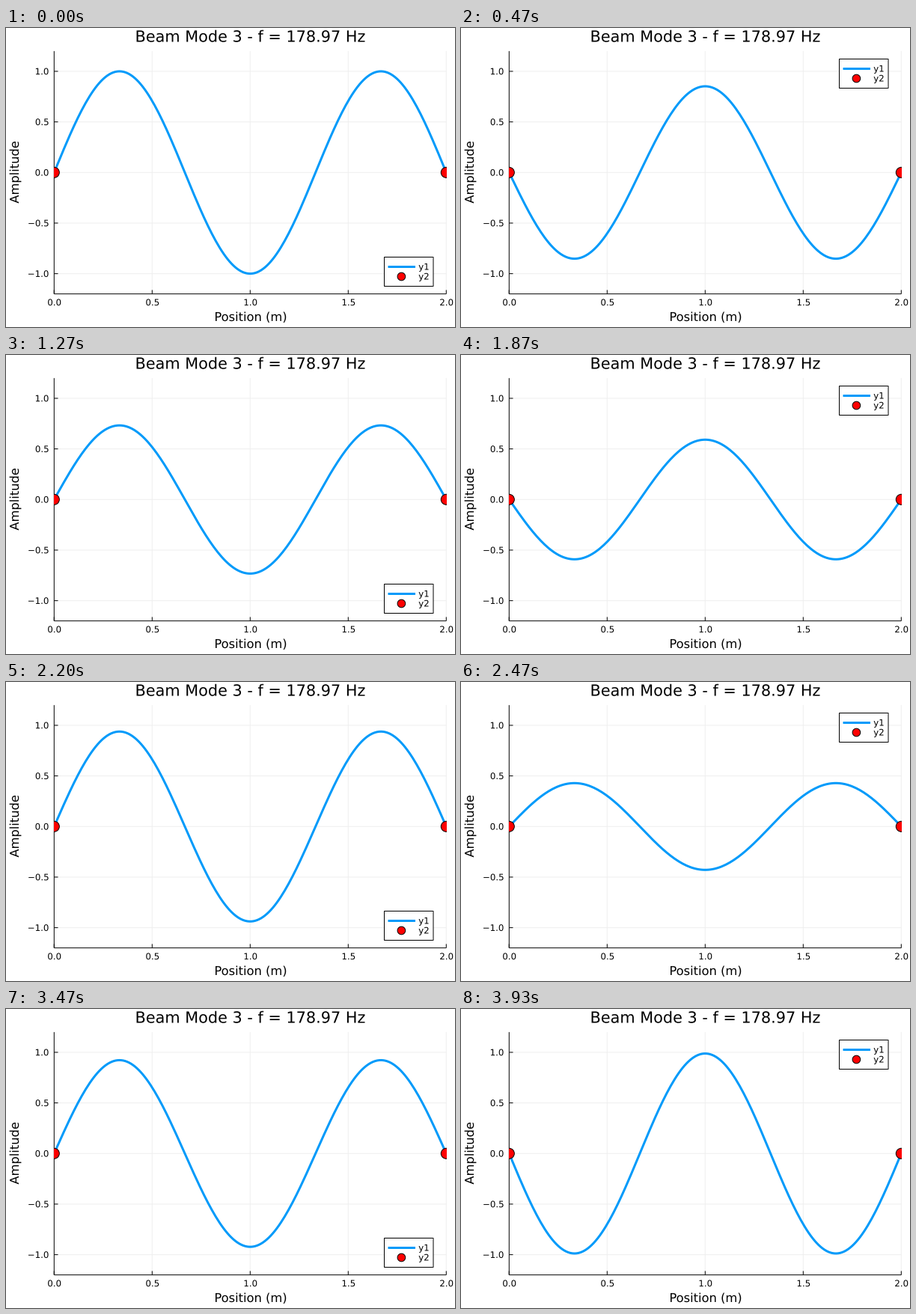
Animation of 600 by 400 pixels, one loop 3990 ms. Source, as a matplotlib script:

```python
import numpy as np
import matplotlib.pyplot as plt
from matplotlib.animation import FuncAnimation
from matplotlib.collections import LineCollection
from matplotlib.patches import Circle, PathPatch, Rectangle
from matplotlib.textpath import TextPath
from matplotlib.transforms import Affine2D

W, H, DPI = 600, 400, 100
TICK_MS, TICKS = 10, 399
RATE = 15                       # pictures per second
CYCLES = 0.058905               # vibration cycles per picture
MODE, LENGTH = 3, 2.0
LEFT, RIGHT, MID, UNIT = 64.3, 588.3, 193.3, 135.35
TOP, BOTTOM = MID - 1.2 * UNIT, MID + 1.2 * UNIT
BLUE = "#009afa"

plt.rcParams["font.family"] = "DejaVu Sans"
plt.rcParams["path.snap"] = False


def px(x):
    return LEFT + (RIGHT - LEFT) * np.asarray(x) / LENGTH


def py(y):
    return MID - UNIT * np.asarray(y)


def pt(pixels):
    return pixels * 72 / DPI


fig = plt.figure(figsize=(W / DPI, H / DPI), dpi=DPI, facecolor="white")
ax = fig.add_axes([0, 0, 1, 1])
ax.set(xlim=(0, W), ylim=(H, 0))
ax.axis("off")
legend_shift = Affine2D()
legend_space = legend_shift + ax.transData


def add(patch, z, space=ax.transData):
    patch.set(transform=space, zorder=z)
    ax.add_artist(patch)
    return patch


def text(x, y, s, size, align=0.5, angle=0, z=1, space=ax.transData):
    """Outlined text on the baseline y; align runs from 0 (left) to 1 (right)."""
    path = TextPath((0, 0), s, size=size)
    shift = -align * path.get_extents().x1
    place = Affine2D().translate(shift, 0).scale(1, -1).rotate_deg(-angle)
    path = path.transformed(place.translate(x, y))
    add(PathPatch(path, fc="black", lw=0), z, space)


def segments(lines, color, width, z):
    ax.add_collection(LineCollection(lines, colors=color, linewidths=pt(width),
                                     zorder=z), autolim=False)


def dot(x, y, radius, z, space=ax.transData):
    return add(Circle((x, y), radius, fc="red", ec="black", lw=pt(1)), z, space)


# Grid, ticks and axes
xticks = np.linspace(0, LENGTH, 5)
yticks = np.linspace(-1, 1, 5)
grid = [[(px(x), TOP), (px(x), BOTTOM)] for x in xticks[1:]]
grid += [[(LEFT, py(y)), (RIGHT, py(y))] for y in yticks]
marks = [[(px(x), BOTTOM), (px(x), BOTTOM - 5.2)] for x in xticks]
marks += [[(LEFT, py(y)), (LEFT + 5.2, py(y))] for y in yticks]
marks += [[(LEFT, TOP), (LEFT, BOTTOM)], [(LEFT, BOTTOM), (RIGHT, BOTTOM)]]
segments(grid, "#efefef", 1, 0)
segments(marks, "black", 1, 1)

for x in xticks:
    text(px(x), 371.2, f"{x:.1f}", 11.8)
for y in yticks:
    text(56.6, py(y) + 4.3, f"{y:.1f}".replace("-", "\u2212"), 11.8, align=1)

text(326, 18.5, "Beam Mode 3 - f = 178.97 Hz", 20.8)
text(326.3, 392, "Position (m)", 16.3)
text(17, MID, "Amplitude", 16.3, angle=90)

# Beam and its supports
xs = np.linspace(0, LENGTH, 200)
shape = np.sin(MODE * np.pi * xs / LENGTH)
beam, = ax.plot(px(xs), py(shape), color=BLUE, lw=pt(3), zorder=3)
supports = [dot(x, MID, 7, 4) for x in (LEFT, RIGHT)]
frame = Rectangle((LEFT, TOP), RIGHT - LEFT + 0.5, BOTTOM - TOP,
                  transform=ax.transData)
for artist in (beam, *supports):
    artist.set_clip_path(frame)

# Legend, laid out from its top edge
add(Rectangle((505.5, 0), 65.5, 39, fc="white", ec="black", lw=pt(1)),
    5, legend_space)
ax.plot([510.5, 547], [13, 13], color=BLUE, lw=pt(3), solid_capstyle="butt",
        zorder=6, transform=legend_space)
dot(528.4, 26, 5.3, 6, legend_space)
for i, label in enumerate(("y1", "y2")):
    text(551.2, 17 + 13 * i, label, 11.8, align=0, z=6, space=legend_space)


def update(tick):
    step = int((tick + 0.5) * TICK_MS * RATE / 1000)
    amp = np.cos(2 * np.pi * CYCLES * step)
    beam.set_ydata(py(amp * shape))
    # The legend leaves the top corner once the curve reaches its quarter
    legend_shift.clear().translate(0, 306.5 if amp > 0.6 else 41.5)
    return beam,


anim = FuncAnimation(fig, update, frames=TICKS, interval=TICK_MS,
                     repeat=True, repeat_delay=0, blit=False)
plt.show()
```
